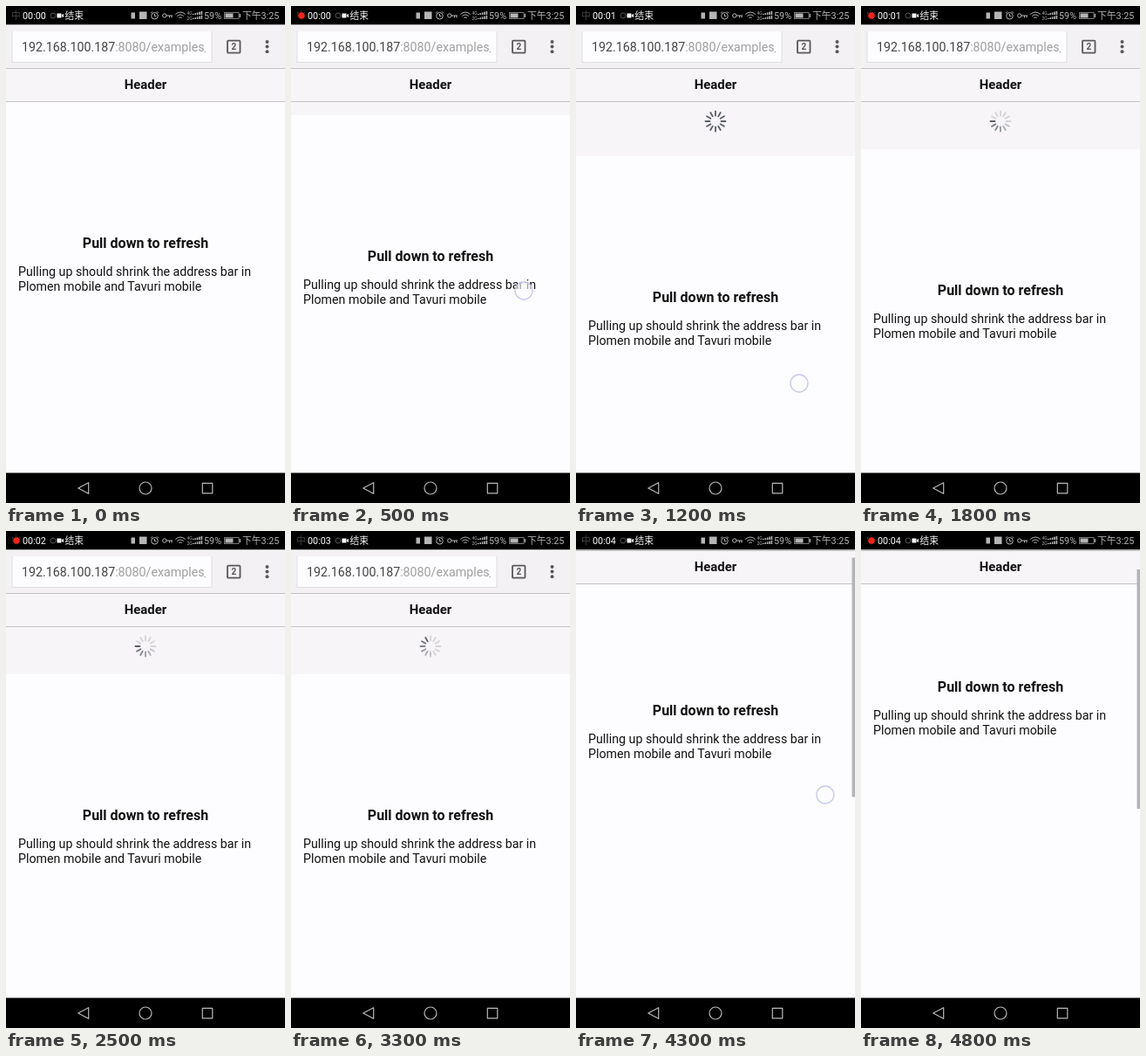
Write an HTML page that moves like this. It is 320x569 px and loops after 5100 ms.

```html
<!DOCTYPE html>
<html lang="en">
<head>
<meta charset="utf-8">
<title>Pull down to refresh</title>
<style>
  html, body { margin: 0; width: 100%; height: 100%; overflow: hidden; background: #000; }
  #stage { display: block; width: 100vw; height: 100vh; }
  text { font-family: Roboto, "Noto Sans CJK SC", "Noto Sans CJK", sans-serif; white-space: pre; }
  .line { fill: none; }
  .mid { text-anchor: middle; font-weight: bold; }
  .copy { font-size: 14.22px; fill: #111; }
  .small { font-size: 10.8px; }
</style>
</head>
<body>
<svg id="stage" viewBox="0 0 320 569">
  <rect y="21" width="320" height="514" fill="#f7f5f8"/>
  <g id="spinner" transform="translate(160 132)" stroke="#5a5f66" stroke-width="1.8" stroke-linecap="round"></g>

  <g id="sheet">
    <rect y="110" width="320" height="620" fill="#fdfcfe"/>
    <text class="mid" x="160" y="276.8" font-size="16" fill="#111">Pull down to refresh</text>
    <text class="copy" x="14" y="309">Pulling up should shrink the address bar in</text>
    <text class="copy" x="14" y="326">Plomen mobile and Tavuri mobile</text>
  </g>

  <g id="top">
    <rect y="21" width="320" height="50" fill="#f3f1f4"/>
    <rect x="6.5" y="29" width="230" height="36" rx="1" fill="#dedddf"/>
    <rect x="7.5" y="29" width="228" height="35" rx="1" fill="#fdfcfe"/>
    <svg x="18" y="30" width="211" height="33">
      <text class="copy" y="22"><tspan fill="#444">192.168.100.187</tspan><tspan fill="#a0a0a0">:8080/examples_</tspan></text>
    </svg>
    <rect class="line" x="254" y="39.7" width="14.5" height="14" rx="1" stroke="#58585a" stroke-width="1.8"/>
    <text class="mid" x="261.3" y="50.4" font-size="10" fill="#58585a">2</text>
    <g fill="#58585a">
      <circle cx="299.5" cy="41" r="2"/><circle cx="299.5" cy="46.6" r="2"/><circle cx="299.5" cy="52.2" r="2"/>
    </g>
    <rect y="71" width="320" height="39" fill="#f7f5f8"/>
    <path d="M0 71.5H320M0 109.5H320" stroke="#c4c3c5"/>
    <text class="mid" x="160" y="95" font-size="14.9" fill="#111">Header</text>
  </g>

  <rect id="scrollbar" x="316.5" width="3.5" height="274" fill="#b4b3b5"/>
  <circle id="touch" r="10" fill="#fdfcfe" fill-opacity=".6" stroke="#c5c9ea" stroke-width="1.3"/>

  <rect width="320" height="21.3"/>
  <text class="small" x="6" y="15" fill="#444">中</text>
  <circle id="dot" cx="12" cy="11" r="4.3" fill="#f0241c" stroke="#000"/>
  <text id="clock" class="small" x="19" y="15" fill="#fff"></text>
  <circle class="line" cx="54" cy="11" r="3" stroke="#555"/>
  <path d="M58.5 8.5h5v5h-5zM64 10l2-1v4l-2-1z" fill="#fff"/>
  <text class="small" x="67.5" y="15" fill="#eee">结束</text>

  <g fill="#b5b5b5">
    <rect x="143.5" y="7.5" width="4.5" height="7"/>
    <rect x="153" y="6.5" width="8.5" height="8.5"/>
    <text class="small" x="227" y="14.7">59%</text>
    <text class="small" x="271" y="15">下午3:25</text>
    <text x="207.5" y="10" font-size="5">4G</text>
    <text x="207.5" y="15.5" font-size="5">2G</text>
    <rect x="251.5" y="8.5" width="9" height="5"/>
    <rect x="267.5" y="9" width="1.5" height="4"/>
    <g id="signal"></g>
  </g>
  <g class="line" stroke="#b5b5b5">
    <circle cx="170.5" cy="11.3" r="3.8"/>
    <path d="M170.5 9v2.6h2M166 8.3l2-2M175 8.3l-2-2"/>
    <circle cx="181.8" cy="11" r="2.2"/>
    <path d="M184 11h7M187.5 11v2.5M190 11v2.5"/>
    <path d="M194.3 9.5q5.7-5 11.4 0M196.3 11.6q3.7-3.2 7.4 0M198.3 13.6q1.7-1.4 3.4 0"/>
    <rect x="250.5" y="7.5" width="16.5" height="7" stroke="#777"/>
  </g>

  <rect y="534.5" width="320" height="35"/>
  <g class="line" stroke="#b8b8b8" stroke-width="1.2" stroke-linejoin="round">
    <path d="M94.7 545.7v12.6L82.8 552z"/>
    <circle cx="160" cy="552" r="7"/>
    <rect x="225.3" y="546.3" width="11.5" height="11.5"/>
  </g>
</svg>
<script>
const $ = id => document.getElementById(id);

// Keys are [time, value] pairs with straight motion in between.
function track(keys, t) {
  const i = keys.findIndex(k => k[0] > t);
  if (i < 0) return keys[keys.length - 1][1];
  if (!i) return keys[0][1];
  const [a, from] = keys[i - 1], [b, to] = keys[i];
  return from + (to - from) * (t - a) / (b - a);
}

const pullY = [[200, 292], [300, 296], [400, 309], [500, 326], [700, 360], [900, 392], [1100, 422], [1200, 432], [1300, 433]];
const swipeY = [[3800, 382], [3900, 377], [4000, 368], [4100, 350], [4200, 326], [4300, 302], [4400, 283]];
const settle = [[1300, 62.4], [1400, 58], [1500, 55], [1600, 54], [3400, 54], [3500, 28], [3600, 7], [3700, 0]];
const scroll = [[4000, 0], [4100, 12], [4200, 38], [4300, 66], [4400, 85], [4500, 91], [4600, 93]];
const barHeight = 49;

for (let i = 0; i < 12; i++)
  $('spinner').innerHTML += `<path d="M0-6.5V-11.5" transform="rotate(${i * 30})"/>`;
for (let i = 0; i < 5; i++)
  for (const base of [10, 15])
    $('signal').innerHTML += `<rect x="${214 + i * 2.4}" y="${base - 1 - i * .8}" width="1.6" height="${1 + i * .8}"/>`;

const spokes = [...$('spinner').children];
const shift = (id, y) => $(id).setAttribute('transform', `translate(0 ${y})`);
const show = (id, on) => $(id).style.display = on ? '' : 'none';

function draw(now) {
  const t = Math.min(4800, Math.floor(now % 5100 / 100) * 100);
  const loading = t >= 1400;
  const pull = loading ? track(settle, t) : Math.round((track(pullY, t) - 292) * .443);
  const up = track(scroll, t);
  const barUp = Math.min(up, barHeight);

  shift('sheet', pull - up);
  shift('top', -barUp);

  const head = Math.floor((t - 1800) / 57.5) + 9;
  const shown = Math.floor((pull - 16) / 38 * 12);
  spokes.forEach((s, i) => {
    const age = ((head - i) % 12 + 12) % 12;
    s.style.opacity = loading ? Math.max(.22, 1 - age * .13) : i < shown ? 1 : 0;
  });

  const swiping = t >= 3800 && t <= 4400;
  show('touch', swiping || t >= 200 && t <= 1300);
  const y = track(swiping ? swipeY : pullY, t);
  const x = swiping ? 272 + (368 - y) * .21 : 267 - (y - 326) * .104;
  $('touch').setAttribute('cx', x);
  $('touch').setAttribute('cy', y);

  show('scrollbar', up > 0);
  $('scrollbar').setAttribute('y', 71 - barUp + (up - barUp) * .5);

  show('dot', t % 1000 >= 500);
  $('clock').textContent = '00:0' + Math.floor(t / 1000);
}

function loop() {
  draw(performance.now());
  requestAnimationFrame(loop);
}
loop();
</script>
</body>
</html>
```
